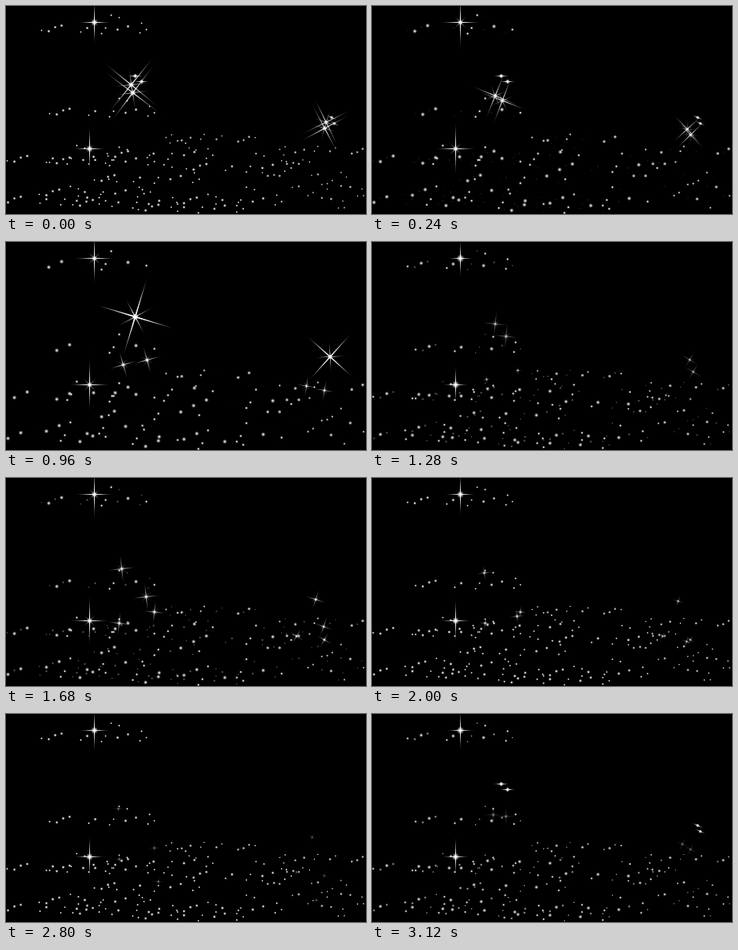
An HTML page with a canvas for the animation above (3200 ms loop, 450 by 260 pixels).

```html
<!DOCTYPE html>
<html>
<head>
<meta charset="utf-8">
<style>
html, body { margin: 0; width: 100%; height: 100%; overflow: hidden; background: #000; }
canvas { display: block; }
</style>
</head>
<body>
<canvas id="sky" width="450" height="260"></canvas>
<script>
const ctx = document.getElementById('sky').getContext('2d');
const LOOP = 3200, STEP = 80, PULSE = 800, TAU = 2 * Math.PI;

// One constellation, brightest stars first; its two halves pulse in opposition.
const even = [[25, -6], [108, -5], [9, 1], [75, 4], [80, -3], [87, -19], [131, -1]];
const odd = [[57, -3], [95, -1], [17, -4], [0, 0], [49, 2], [97, -16], [123, 3], [125, -9]];

// It is repeated across the sky: x, y, and for some a turn in degrees.
const copies = [[44, 30], [54, 134], [1, 193], [-7, 244], [41, 235], [54, 195],
  [110, 217], [127, 187], [83, 248], [165, 254], [213, 245], [225, 203],
  [311, 164, 180.5], [453, 179, 180.5], [320, 208, 23.5], [344, 193, 23.5]];

// Falling sparks: start, end, time of the flash, time of the fall, tilt.
const sparks = [
  { from: [156, 98], to: [141, 181], born: 0, fall: 1450, tilt: 39 },
  { from: [158, 108], to: [185, 167], born: 0, fall: 1450, tilt: 37 },
  { from: [161, 93], to: [140, 118], born: 960, fall: 900, tilt: 17 },
  { from: [161, 93], to: [190, 209], born: 960, fall: 1520, tilt: 17 }
];
const seeds = [[161, 87], [169, 94]];
const burst = [161, 93];

const clamp = v => Math.max(0, Math.min(1, v));
const rad = degrees => degrees * TAU / 360;

function at(x, y, degrees, scale, paint) {
  ctx.save();
  ctx.translate(x, y);
  ctx.rotate(rad(degrees));
  ctx.scale(scale, scale);
  paint();
  ctx.restore();
}

function glow(x, y, r, alpha) {
  const g = ctx.createRadialGradient(x, y, 0, x, y, r);
  g.addColorStop(0, '#fff');
  g.addColorStop(.4, 'rgba(255,255,255,.6)');
  g.addColorStop(1, 'rgba(255,255,255,0)');
  ctx.globalAlpha = alpha;
  ctx.fillStyle = g;
  ctx.fillRect(x - r, y - r, 2 * r, 2 * r);
}

function ray(length, width, degrees) {
  const g = ctx.createRadialGradient(0, 0, 0, 0, 0, length);
  g.addColorStop(0, '#fff');
  g.addColorStop(1, 'rgba(255,255,255,.1)');
  at(0, 0, degrees, 1, () => {
    ctx.fillStyle = g;
    ctx.beginPath();
    ctx.moveTo(-length, 0);
    ctx.lineTo(0, -width);
    ctx.lineTo(length, 0);
    ctx.lineTo(0, width);
    ctx.fill();
  });
}

function sparkle(x, y, across, down, diagonal, degrees, core, alpha) {
  at(x + .5, y + .5, degrees, 1, () => {
    glow(0, 0, core, alpha);
    ray(across, .75, 0);
    ray(down, .75, 90);
    ray(diagonal, .4, 45);
    ray(diagonal, .4, -45);
  });
}

function drawDots(points, level) {
  for (const [x, y, turn = 0] of copies)
    at(x + .5, y + .5, turn, turn ? .85 : 1, () => points.forEach(([dx, dy], i) =>
      glow(dx, dy, (i < 3 ? 2.9 : 2) * (.5 + .5 * level), clamp(level * 2.6))));
}

function drawSpark({ from, to, born, fall, tilt }, t, wave) {
  const since = t - born;
  const fade = clamp(1 + since / 160) * clamp((2900 - t) / 300);
  if (!fade) return;
  // Before its flash a spark races up the path it will fall along.
  const age = since < 0 ? -6 * since : since;
  const p = clamp(age / fall);
  const [x, y] = from.map((v, i) => v + (to[i] - v) * p);
  const flash = Math.exp(-age / 320);
  const size = 10 + 7 * wave + 34 * flash;
  const angle = tilt * Math.exp(-age / 1100) * Math.cos(Math.PI * age / 960);
  const alpha = clamp(.5 + .25 * wave + .5 * flash ** 2) * fade;
  sparkle(x, y, size, size, size / 2, angle, 2 + size * .04, alpha);
}

function drawFirework(t, wave) {
  const time = t > 2900 ? t - LOOP : t;
  if (time < 720)
    for (const [x, y] of seeds) sparkle(x, y, 10, 4, 2, 0, 3, clamp((time + 300) / 160));
  for (const spark of sparks) drawSpark(spark, time, wave);
}

function draw(t) {
  const wave = Math.sin(TAU * (t / PULSE + .02));
  ctx.globalAlpha = 1;
  ctx.fillStyle = '#000';
  ctx.fillRect(0, 0, 450, 260);
  drawDots(even, (1 + wave) / 2);
  drawDots(odd, (1 - wave) / 2);
  for (const [x, y] of [[110, 20], [104, 178]])
    sparkle(x, y, 20 + 6 * wave, 28 + 6 * wave, 7 + 5 * wave, 0, 4.3 - wave, 1);
  drawFirework(t, wave);
  // The second firework is the first one, smaller and turned.
  at(405, 143, 25, .76, () => {
    ctx.translate(-burst[0], -burst[1]);
    drawFirework(t, wave);
  });
}

const start = performance.now();
function frame() {
  const t = (performance.now() - start) % LOOP;
  draw(Math.floor(t / STEP) * STEP);
  requestAnimationFrame(frame);
}
frame();
</script>
</body>
</html>
```
